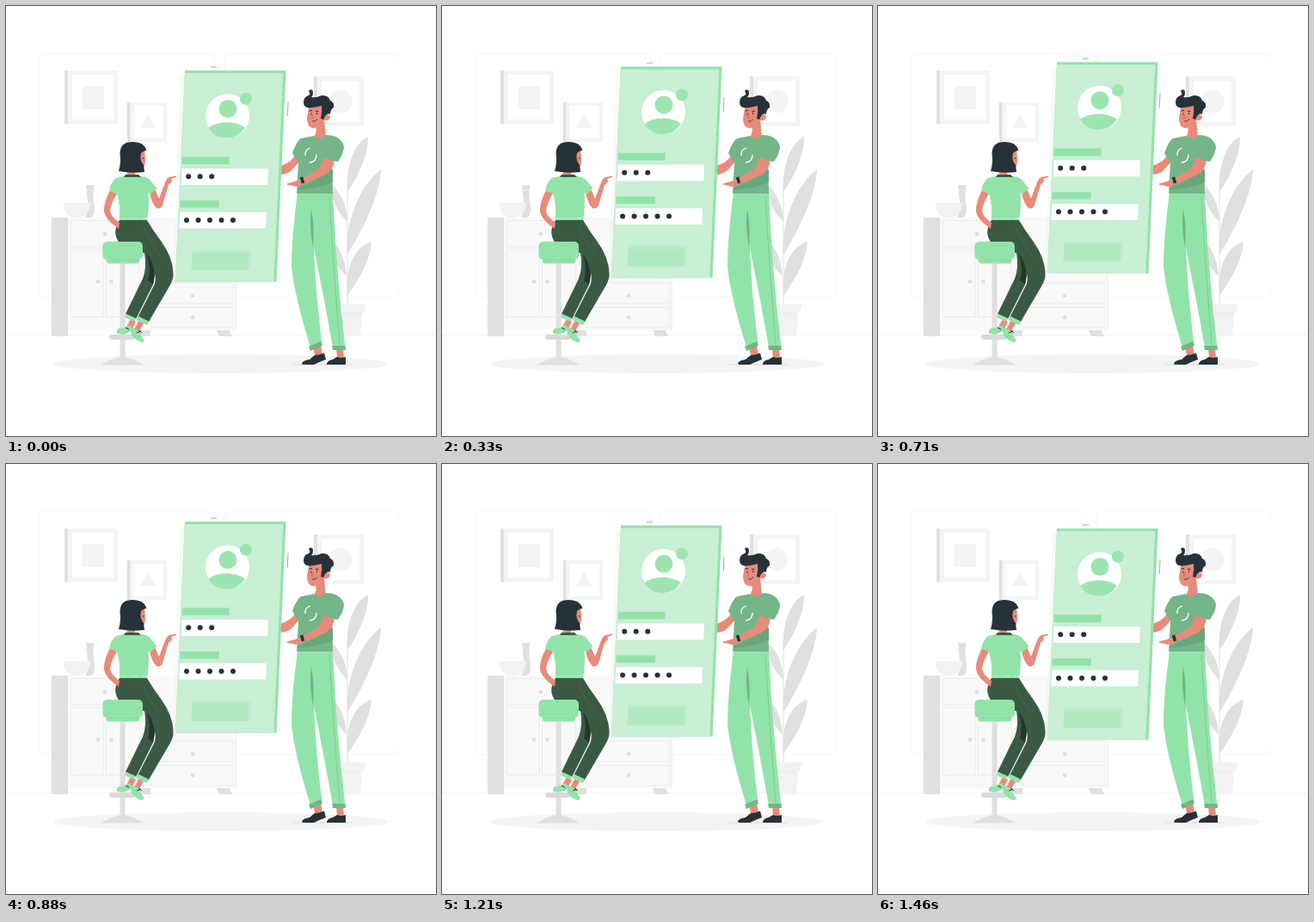
These frames come from a looping animation (500 px wide and 500 px high, 1500 ms). An HTML page:

```html
<!DOCTYPE html>
<html lang="en">
<head>
<meta charset="utf-8">
<title>Sign-in scene</title>
<style>
  html, body { margin: 0; width: 100%; height: 100%; overflow: hidden; background: #fff; }
  svg { display: block; width: 100%; height: 100%; }
  .green { fill: #92e3a9; }
  .leaf { fill: #74b587; }
  .dark { fill: #263238; }
  .skin { fill: #e78b7a; }
  .pants { fill: #3a5a44; }
  .g1 { fill: #e0e0e0; }
  .g2 { fill: #f4f4f4; }
  .g3 { fill: #f9f9f9; }
  .white { fill: #fff; }
  .line { fill: none; stroke: #ebebeb; }
</style>
</head>
<body>
<svg viewBox="0 0 500 500">
  <!-- room -->
  <g fill="none" stroke="#f7f7f7">
    <rect x="38.5" y="55.5" width="203.5" height="282" rx="4"/>
    <rect x="254.5" y="55.5" width="203.5" height="282" rx="4"/>
    <path d="M0 382.5H500" stroke="#f3f3f3"/>
    <path d="M64 398H80" stroke="#fafafa"/>
  </g>
  <g id="frames"></g>
  <rect class="g2" x="89" y="93" width="25" height="27"/>
  <path class="g2" d="M165 125L174.500 142H156Z"/>
  <circle class="g2" cx="389" cy="111" r="13.500"/>

  <!-- cabinet -->
  <path class="g1" d="M53 246H72V384H53ZM150 377H168V384H153ZM245 377H260L263 384H248Z"/>
  <rect class="g3" x="72" y="246" width="196" height="131"/>
  <path class="line" d="M75.500 249.500H155V280H75.500ZM75.500 283H113V361.500H75.500ZM116.500 283H155V361.500H116.500ZM168 322H264V346H168ZM168 350.500H264V374H168ZM267 246V377"/>
  <g class="g1">
    <circle cx="115" cy="265" r="2.300"/><circle cx="107" cy="320.500" r="2.300"/><circle cx="122.500" cy="320.500" r="2.300"/>
    <circle cx="217" cy="337" r="2.300"/><circle cx="217" cy="362" r="2.300"/>
    <path d="M93 208H102.500C100 222 103 228 103 236Q103 246 97 246H92Q96 239 95 228Z"/>
  </g>
  <path d="M66.500 229H98Q97 246 82 246Q67 246 66.500 229Z" fill="#f2f2f2"/>

  <!-- plant -->
  <path d="M397 205V347" stroke="#e0e0e0"/>
  <path class="g1" d="M397 216C395 188 404 160 421 152C422 172 408 202 397 216ZM397 289C394 250 412 208 436 190C435 220 414 262 397 289ZM397 337C394 304 405 280 425 274C424 296 409 320 397 337ZM397 251C397 231 388 215 376 205C378 226 386 240 397 251ZM396 314C395 294 387 278 376 270C377 291 384 304 396 314Z"/>
  <path d="M390 347H419L416 357H414L412 384H391Z" fill="#f2f2f2"/>
  <path d="M391 357.500H414" stroke="#e9e9e9"/>

  <ellipse cx="249.500" cy="416" rx="194" ry="11" fill="#f4f4f4"/>

  <!-- far arm of the man, behind the screen -->
  <path class="skin" d="M341 168L333 178Q327 184 318 186V196Q328 196 333 190L344 178Z"/>

  <!-- screen -->
  <g id="screen">
    <path d="M203 81L194 320.500H200L209 81Z" fill="#eee" opacity=".4"/>
    <path d="M238 71H245" stroke="#92e3a9" stroke-width="1.500"/>
    <path d="M328 111L327.300 128" stroke="#aaa"/>
    <path class="green" d="M208 75H325.500L314.500 320.800H197Z"/>
    <path d="M207.800 78H322.300L311.300 320.800H196.800Z" fill="#c8eed4"/>
    <ellipse class="white" cx="257.500" cy="128" rx="25.500" ry="25.700"/>
    <circle cx="258" cy="119.500" r="10.500" fill="#9ce5b1"/>
    <path d="M235.500 141.500C246 133 267 133 278 141.500Q270 153.700 257 153.700Q242 153.500 235.500 141.500Z" fill="#9ce5b1"/>
    <circle cx="278.800" cy="107.700" r="7" fill="#9ce5b1"/>
    <path class="green" d="M205 175.300H259.800L259.400 184H204.600ZM202.700 226H248L247.600 234.500H202.300Z"/>
    <path class="white" d="M204.500 189H305L304.200 208H203.700ZM202.200 239.700H303L302.200 258.600H201.400Z"/>
    <g id="dots" class="dark"></g>
    <path d="M216.500 283.700H284.400L283.500 307H215.600Z" fill="#b9ebc7"/>
    <path d="M216.400 287H281.700L281 307H215.600Z" fill="#b0e9c0"/>
  </g>

  <!-- stool -->
  <path class="g1" d="M132.500 298H138.500V408Q150 411 161 417.500H110Q121 411 132.500 408Z"/>
  <rect x="120" y="382" width="30" height="6" rx="3" fill="#d9d9d9"/>

  <!-- woman -->
  <path class="skin" d="M145 364L140 373L146 377L151 367ZM155 365L149 376L155 378L160 369Z"/>
  <path class="green" d="M143 371L149 376Q139 383 130 381Q127 379 131 375Q138 375 143 371ZM148 374L156 378Q156 384 160 387Q162 391 157 391Q147 387 145 380Z"/>
  <path d="M139 374L143 376M152 380L157 378M154 377L158 380" stroke="#263238" fill="none"/>
  <path class="pants" d="M150 285L161 287Q164 304 159 317L139 358L151 364L171 324L178 285Z"/>
  <path d="M164 289Q176 303 171 324L165 319Q169 305 164 289Z" fill="#22372a"/>
  <path class="pants" d="M132 249H164Q171 261 180 273Q194 292 194.500 311Q195 318 190 326L165.500 368L153.500 361.500L173 323Q176 309 165 289L133 277Q122 264 132 249Z"/>
  <path d="M160 258Q165 272 179 291" fill="none" stroke="#52725c" stroke-width=".6"/>
  <path class="green" d="M139.500 358L151 363L149 367L138 362ZM153.500 360.500L166 366.500L164 371L151.500 365Z"/>
  <path class="skin" d="M121 214Q113 230 114 239Q116 249 131 259L132 252Q122 245 121 238Q122 230 129 218Z"/>
  <path class="skin" d="M167 217L173 213L178 224L184 208Q186 201 190 199L198 197.500V199L192 201Q195 204 189 208L182 232Q179 237 175 235Q169 229 167 217Z"/>
  <path class="skin" d="M141 190H150V198H141Z"/>
  <path class="green" d="M137 198H157Q166 199 168 203L175.500 212L168 219L165.500 217Q167 232 164 249H132Q133 230 129 218L120 215Q122 204 128 200Z"/>
  <path d="M133 246.500H164" stroke="#c1f0cf" stroke-dasharray="10 2"/>
  <path d="M137 199L139 196H154L157 199Z" class="pants"/>
  <path class="skin" d="M154 168H161L162.300 178L161 187H154Z"/>
  <path class="dark" d="M131 192Q134 183 132.500 171Q133 158 147 158Q161 158 163.300 168Q160 168 157 171Q155 179 160 185L161 193Q146 195 131 192Z"/>
  <path d="M159.500 176V178" stroke="#263238" stroke-width=".8"/>
  <rect x="117" y="290" width="38" height="9.500" rx="3" class="green"/>
  <rect x="112.500" y="274" width="46.500" height="21" rx="5" class="green"/>
  <path d="M117 295.500H155" stroke="#86d59d" stroke-width=".6"/>

  <!-- man -->
  <path d="M334 417H403" stroke="#ddd"/>
  <path class="skin" d="M357 396L366 394L368 406H359ZM384 398H392L393 410H385Z"/>
  <path class="dark" d="M344 415Q346 412 353 411L359 406Q364 406 370 403.500L372 411Q364 414 358 417H345ZM373 416Q374 412 380 411L385 408Q390 410 395 408V417H373Z"/>
  <path class="green" d="M339 217H380Q384 310 394.500 397H380Q370 340 358 281Q361 345 367.500 392L354 397Q335 335 332 303Q332 270 339 217Z"/>
  <path class="leaf" d="M352 396L366 390L368 395L354 401ZM379 395H394.500L395 400H380ZM355 236Q352 256 357 281Q359 257 355 236Z"/>
  <path d="M376 222Q381 310 388 394" fill="none" stroke="#74b587" stroke-width=".6"/>
  <path class="skin" d="M359 137L361 145L358 154Q364 157 372 152L370 133Z"/>
  <path class="leaf" d="M358 151Q364 157 372 150Q389 150 393 163Q393 171 386 181L379 180L380 218H338L340 182L333 171Q338 157 343 154Z"/>
  <path d="M339 212Q362 203 380 190V205Q360 213 339 214Z" fill="#68a67b"/>
  <path class="skin" d="M370 176L382 181Q379 193 370 197L347 206Q338 212 334 209L327 208V206.500L336 204L345 200L363 190Z"/>
  <path d="M343.500 199L345.500 206" stroke="#263238" stroke-width="3.500"/>
  <path d="M348 174Q347 167 354 165M353 182Q361 181 361 173" fill="none" stroke="#fff" stroke-width="1.300"/>
  <path class="skin" d="M353 114L350 130Q350 141 357 142Q365 142 370 133Q376 134 377 129Q375 124 371 127L370 114Z"/>
  <path class="dark" d="M346 112Q346 106 351 104.500Q355 103 352 99Q353 96 356.500 98Q358 103 355 106Q361 107 367 104Q375 103 377 110Q382 112 381 118Q377 120 377 126Q374 124 371 128L369 132L366 131Q368 123 367 116Q359 118 353 118.500Q346 118 346 112Z"/>
  <path d="M355 124.500V126.500M361.500 124V126M352.500 122L356 121.500M360 122L363.500 122.500" stroke="#263238" fill="none"/>
  <path d="M357 126L355.500 130H357.500" fill="none" stroke="#bf5f51" stroke-width=".7"/>
  <path d="M356 134Q360 135 362 131.500" fill="none" stroke="#263238" stroke-width=".8"/>
</svg>
<script>
  const byId = id => document.getElementById(id);

  const pictureFrame = (x, y, w, h, side, border) => `
    <path class="g1" d="M${x} ${y}h${side}v${h}h${-side}z"/>
    <path class="g2" d="M${x + side} ${y}h${w - side}v${h}h${side - w}z"/>
    <rect class="white" x="${x + side + border}" y="${y + border}"
      width="${w - side - 2 * border}" height="${h - 2 * border}"/>`;
  byId('frames').innerHTML = pictureFrame(68, 75, 62, 62, 4, 5)
    + pictureFrame(141, 112, 46, 46, 3.5, 4)
    + pictureFrame(358, 82, 58, 58, 4, 5);

  const dotRow = (count, x, y) => Array.from({ length: count },
    (_, i) => `<circle cx="${x + i * 13.5}" cy="${y}" r="3"/>`).join('');
  byId('dots').innerHTML = dotRow(3, 212.2, 198.3) + dotRow(5, 210, 249);

  const LOOP = 1500, STEPS = 36, LIFT = 10;
  const start = performance.now();

  // The screen rises and sinks at constant speed; the first and last steps both rest at the bottom.
  function draw() {
    const time = (performance.now() - start) % LOOP;
    const step = Math.floor((time + 5) * STEPS / LOOP) % STEPS;
    const lift = LIFT * (1 - Math.abs(1 - 2 * step / (STEPS - 1)));
    byId('screen').setAttribute('transform', `translate(0 ${-lift})`);
    requestAnimationFrame(draw);
  }
  draw();
</script>
</body>
</html>
```
